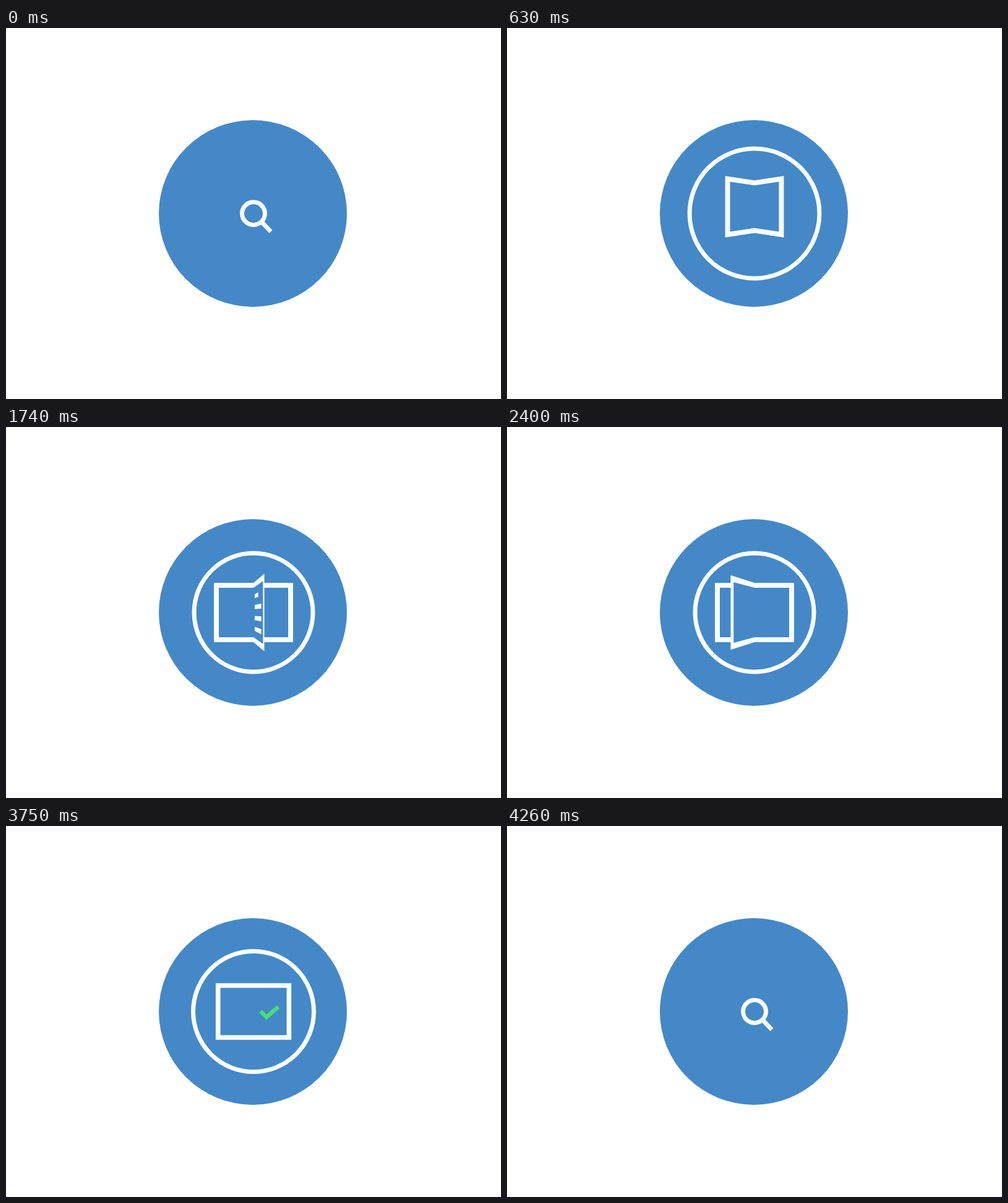
An HTML page with a canvas that plays this animation: 800 by 600 pixels, repeating every 4.53 s.

```html
<!DOCTYPE html>
<html lang="en">
<head>
<meta charset="utf-8">
<title>Search</title>
<style>
html, body { margin: 0; width: 100%; height: 100%; overflow: hidden; background: #fff; }
canvas { display: block; }
</style>
</head>
<body>
<canvas id="stage" width="800" height="600"></canvas>
<script>
const ctx = document.getElementById('stage').getContext('2d');
const BLUE = '#4488c7', WHITE = '#f9ffff', GREEN = '#4adc76';
const LOOP = 4530, STEP = 30;
const OPEN = 480, OPEN_END = 780, CLOSE = 3720;
const FLIP_START = 1044, FLIP_TIME = 306, CYCLE = 570, FLIPS = 3;
const FOUND_PHASE = 456, REVEAL = 2970;
const HALF_W = 64, HALF_H = 48, EDGE = 8, LEAN = 0.32;

const clamp = x => Math.max(0, Math.min(1, x));
const progress = (t, start, length) => clamp((t - start) / length);
const backIn = p => p * p * (6.3 * p - 5.3);
const backOut = p => 1 - backIn(1 - p);

function stroke(points, color, width, closed) {
  ctx.beginPath();
  points.forEach(([x, y]) => ctx.lineTo(x, y));
  if (closed) ctx.closePath();
  ctx.strokeStyle = color;
  ctx.lineWidth = width;
  ctx.stroke();
}

function fill(points, color) {
  ctx.beginPath();
  points.forEach(([x, y]) => ctx.lineTo(x, y));
  ctx.fillStyle = color;
  ctx.fill();
}

function circle(radius, width) {
  ctx.beginPath();
  ctx.arc(0, 0, radius, 0, Math.PI * 2);
  ctx.strokeStyle = WHITE;
  ctx.lineWidth = width;
  ctx.stroke();
}

function handle(amount) {
  if (amount > 0) stroke([[13, 13.5], [13 + 15 * amount, 13.5 + 15.8 * amount]], WHITE, 7);
}

function magnifier(x, y, scale) {
  if (scale <= 0) return;
  ctx.save();
  ctx.translate(x, y);
  ctx.scale(scale, scale);
  circle(18.5, 7);
  handle(1);
  ctx.restore();
}

// Text rows on a page; place maps page coordinates to the stage.
function textRows(place, amount) {
  if (amount <= 0) return;
  [-25.5, -8.5, 8.5, 25.5].forEach((y, row) => {
    const left = 7, right = left + (row ? 39 : 21) * amount;
    fill([place(left, y - 3.3), place(right, y - 3.3),
          place(right, y + 3.3), place(left, y + 3.3)], WHITE);
  });
}

function turningPage(angle) {
  const cos = Math.cos(angle), sin = Math.sin(angle);
  const place = (u, v) => [u * cos, v * (1 + LEAN * sin * u / HALF_W)];
  const w = HALF_W, h = HALF_H, e = EDGE;
  fill([place(0, -h), place(w, -h), place(w, h), place(0, h)], WHITE);
  fill([place(0, e - h), place(w - e, e - h), place(w - e, h - e), place(0, h - e)], BLUE);
  if (cos > 0) textRows(place, 1);
}

function openingBook(t) {
  const rest = 1 - progress(t, OPEN, OPEN_END - OPEN);
  const scale = 1 - rest ** 3, angle = rest * Math.PI / 2;
  const x = 60 * scale * Math.cos(angle) * (1 + 0.24 * Math.sin(angle));
  const inner = 44 * scale, outer = inner * (1 + 0.24 * Math.sin(angle));
  ctx.save();
  ctx.translate(0, -22 * rest);
  stroke([[-x, -outer], [0, -inner], [x, -outer], [x, outer], [0, inner], [-x, outer]],
    WHITE, EDGE * Math.min(1, scale * 1.2), true);
  ctx.restore();
}

function checkMark(amount) {
  if (amount <= 0) return;
  const short = clamp(amount / 0.35), long = clamp((amount - 0.35) / 0.65);
  const points = [[11.8, -0.5], [11.8 + 10.4 * short, -0.5 + 9.9 * short]];
  if (long > 0) points.push([22.2 + 19.6 * long, 9.4 - 17.2 * long]);
  stroke(points, GREEN, 6.8);
}

function pages(t) {
  const flat = (u, v) => [u, v];
  const lastFlip = FLIP_START + (FLIPS - 1) * CYCLE;
  const phase = t < lastFlip
    ? (t - FLIP_START + CYCLE) % CYCLE
    : Math.min(t - lastFlip, FOUND_PHASE);
  const turning = t >= FLIP_START && phase < FLIP_TIME;
  stroke([[-60, -44], [60, -44], [60, 44], [-60, 44]], WHITE, EDGE, true);

  const fade = 1 - progress(t, REVEAL - STEP, 240);
  textRows(flat, progress(phase, 240, 90) * fade);
  if (turning) turningPage(Math.PI * phase / FLIP_TIME);

  const turn = (65 - (phase - FOUND_PHASE) * 1.2) * Math.PI / 180;
  const size = progress(phase, 290, 60) * (1 - progress(phase, 510, 36)) * fade;
  magnifier(35 + 16.5 * Math.cos(turn), 22 + 16.5 * Math.sin(turn), size);
  checkMark(progress(t, 3150, 240));
}

function book(t) {
  if (t <= OPEN) return;
  if (t < OPEN_END) return openingBook(t);
  const scale = 1 - progress(t, CLOSE, 300) ** 1.35;
  if (scale <= 0) return;
  ctx.save();
  ctx.scale(scale, scale);
  pages(t);
  ctx.restore();
}

function draw(t) {
  ctx.fillStyle = '#fff';
  ctx.fillRect(0, 0, 800, 600);
  ctx.beginPath();
  ctx.ellipse(399, 300, 152, 151, 0, 0, Math.PI * 2);
  ctx.fillStyle = BLUE;
  ctx.fill();

  ctx.save();
  ctx.translate(400, 300);
  const growth = t < CLOSE
    ? backOut(progress(t, 310, 383))
    : 1 - backIn(progress(t, CLOSE, 480));
  circle(18.5 + 77.5 * growth, 7);
  handle(t < CLOSE ? 1 - progress(t, 0, 310) : progress(t, 4170, 90));
  book(t);
  ctx.restore();
}

const began = performance.now();
function tick() {
  const t = (performance.now() - began) % LOOP;
  draw(Math.floor(t / STEP) * STEP);
  requestAnimationFrame(tick);
}
tick();
</script>
</body>
</html>
```
